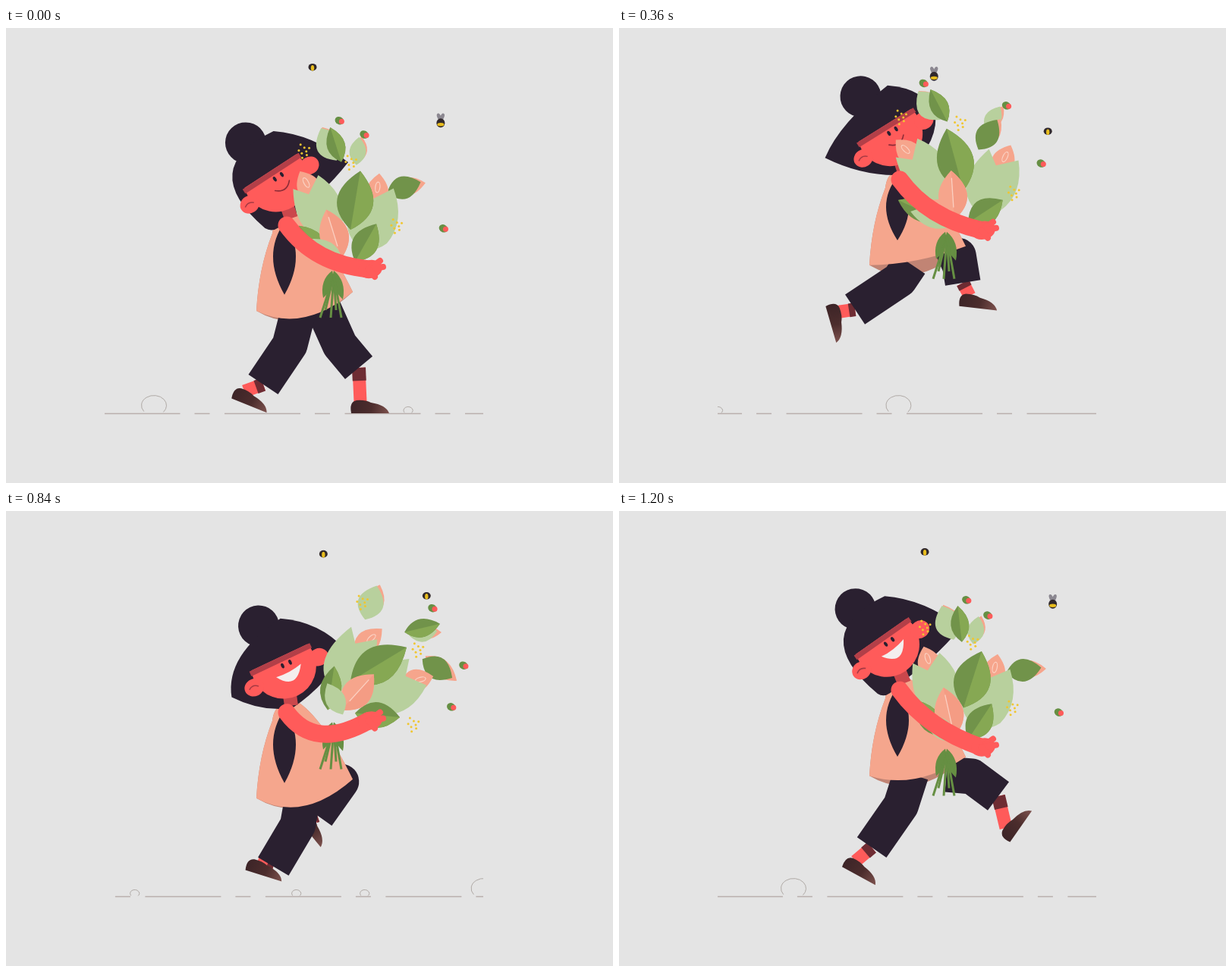
Write an HTML page with a canvas that moves like this. It is 800x600 px and loops after 1240 ms.

```html
<!DOCTYPE html>
<html>
<head>
<meta charset="utf-8">
<style>
html, body { margin: 0; width: 100%; height: 100%; overflow: hidden; background: #e4e4e4 }
canvas { display: block }
</style>
</head>
<body>
<canvas id="stage" width="800" height="600"></canvas>
<script>
const ctx = document.getElementById('stage').getContext('2d');
const LOOP = 1240, STRIDE = LOOP / 2, STEP = 40, RAD = Math.PI / 180;
const INK = '#2a2030', SKIN = '#ff5b5a', SHIRT = '#f5a68d', LINING = '#c18474', PINK = '#f6a58c',
  LIGHT = '#b8d09d', DARK = '#71934a', MID = '#86a853', STEM = '#668f43', YELLOW = '#f0c630';

// Swings between -1 and 1, highest at the peak time.
const wave = (t, peak, period = LOOP) => Math.cos(2 * Math.PI * (t - peak) / period);
const shift = ([x, y], dx, dy) => [x + dx, y + dy];
const polar = ([x, y], degrees, r) => [x + r * Math.sin(degrees * RAD), y - r * Math.cos(degrees * RAD)];
const mix = (a, b, u) => a.map((v, i) => v + (b[i] - v) * u);

// One leg's cycle; the other runs half a loop later. Time, knee, cuff, ankle, shoe angle.
const gait = [
  [0, 440, 418, 465, 448, 467, 493, 0],
  [160, 395, 440, 381, 499, 362, 491, 0],
  [350, 370, 332, 311, 371, 290, 374, 74],
  [520, 367, 342, 320, 390, 305, 420, 46],
  [620, 374, 418, 339, 470, 314, 479, 22],
  [680, 372, 428, 322, 455, 305, 473, 42],
  [780, 437, 390, 385, 433, 370, 435, 58],
  [970, 447, 300, 451, 336, 459, 353, 10],
  [1140, 450, 325, 480, 343, 499, 381, -57],
  [1200, 465, 350, 500, 376, 510, 418, -55]
];

// Everything in the bouquet leans by aim + sway * wave and ends at a distance from the grip.
const cups = [
  { dx: -4, dy: -50, w: 30, aim: -4.5, sway: 24, peak: 840, len: 128 },
  { dx: 40, dy: -32, w: 33, aim: 43, sway: 18, peak: 740, len: 131 }
];
const leaves = [
  { dx: 22, dy: -60, w: 24, aim: 20, sway: 23, peak: 880, len: 142, colors: [DARK, MID] },
  { dx: 28, dy: -18, w: 17, aim: 62, sway: 25, peak: 710, len: 88, colors: [DARK, MID] },
  { dx: -8, dy: -22, w: 14, aim: -28, sway: 29, peak: 880, len: 80, colors: [DARK, MID] },
  { dx: 10, dy: -22, w: 19, aim: 14, sway: 26, peak: 750, len: 87, colors: [PINK, '#f49c84'], vein: true },
  { dx: 12, dy: -16, w: 13, aim: -32, sway: 25, peak: 910, len: 58, colors: [LIGHT] }
];
const sprigs = [
  { size: 51, w: 17, aim: 1, sway: 16, peak: 850, len: 198, colors: [LIGHT], petal: true },
  { size: 40, w: 11, aim: 29, sway: 22, peak: 730, len: 188, colors: [LIGHT], petal: true },
  { size: 48, w: 12, aim: 15, sway: 31, peak: 820, len: 195, colors: [DARK, MID] },
  { size: 50, w: 15, aim: 46, sway: 24, peak: 910, len: 171, colors: [DARK], petal: true }
];
const tinyBuds = [
  { aim: 13, sway: 27, peak: 850, len: 204 },
  { aim: 37, sway: 31, peak: 750, len: 190 },
  { aim: 67, sway: 15, peak: 930, len: 158 }
];
const pollen = [
  { aim: -6, sway: 19, peak: 850, len: 168 },
  { aim: 68, sway: 22, peak: 770, len: 105 },
  { aim: 23, sway: 25, peak: 810, len: 150 }
];

// Periodic monotone cubic through rows of [time, ...values].
function sample(rows, t) {
  const k = rows.length, row = j => rows[(j + k) % k];
  const span = j => (row(j + 1)[0] - row(j)[0] + LOOP) % LOOP;
  const slope = (j, c) => (row(j + 1)[c] - row(j)[c]) / span(j);
  const tangent = (j, c) => {
    const a = slope(j - 1, c), b = slope(j, c);
    return a * b <= 0 ? 0 : 2 * a * b / (a + b);
  };
  let i = k - 1;
  while (rows[i][0] > t) i--;
  const h = span(i), u = (t - rows[i][0]) / h, v = 1 - u;
  return rows[0].slice(1).map((_, n) => {
    const c = n + 1;
    return v * v * (1 + 2 * u) * row(i)[c] + u * u * (3 - 2 * u) * row(i + 1)[c] +
      h * u * v * (v * tangent(i, c) - u * tangent(i + 1, c));
  });
}

function fill(color, draw) {
  ctx.beginPath();
  draw();
  ctx.fillStyle = color;
  ctx.fill();
}
function stroke(color, width, draw, cap = 'butt') {
  ctx.beginPath();
  draw();
  Object.assign(ctx, { strokeStyle: color, lineWidth: width, lineCap: cap, lineJoin: 'round' });
  ctx.stroke();
}
function line(...points) {
  points.forEach((p, i) => i ? ctx.lineTo(...p) : ctx.moveTo(...p));
}
// Start point, then pairs of handle and corner.
function curve(start, ...points) {
  ctx.moveTo(...start);
  for (let i = 0; i < points.length; i += 2) ctx.quadraticCurveTo(...points[i], ...points[i + 1]);
}
const oval = (x, y, rx, ry = rx, a = 0) => ctx.ellipse(x, y, rx, ry, a, 0, 7);
function local([x, y], angle, draw) {
  ctx.save();
  ctx.translate(x, y);
  ctx.rotate(angle);
  draw();
  ctx.restore();
}
// Runs draw(length) with the x axis pointing from one point to the other.
function along([x, y], [tx, ty], draw) {
  local([x, y], Math.atan2(ty - y, tx - x), () => draw(Math.hypot(tx - x, ty - y)));
}
function leaf(root, tip, w, [a, b]) {
  along(root, tip, len => {
    const half = side => curve([0, 0], [len * .45, side * w * 2], [len, 0]);
    fill(a, () => { half(1); half(-1); });
    if (b) fill(b, () => half(1));
  });
}

function ground(t) {
  ctx.save();
  ctx.beginPath();
  ctx.rect(130, 400, 499, 130);
  ctx.clip();
  const period = 158.5, start = (129.5 - 1.068 * t) % period - period;
  stroke('#b9aeac', 1.5, () => {
    for (let x = start; x < 640; x += period) {
      line([x, 508.5], [x + 100, 508.5]);
      line([x + 119, 508.5], [x + 139, 508.5]);
    }
  });
  const stone = (x, r) => stroke('#b0aaa6', 1, () => ctx.ellipse(x - 1.11 * t, 508 - r * .62, r, r * .8, 0, 2.5, 7));
  for (const x of [195, 768, 1562]) stone(x, 16.5);
  for (const x of [530, 1102, 1315, 1405]) stone(x, 6);
  ctx.restore();
}

function leg(t, neck) {
  const [kx, ky, cx, cy, ax, ay, angle] = sample(gait, t % LOOP);
  const hip = [(kx + 398) / 2, neck[1] + 120], knee = [kx, ky], cuff = [cx, cy], ankle = [ax, ay];
  stroke(SKIN, 17, () => line(cuff, ankle));
  stroke('#6e2c33', 18, () => line(cuff, mix(cuff, ankle, .38)));
  local(ankle, angle * RAD, () => {
    const shade = ctx.createLinearGradient(-12, 0, 38, 8);
    shade.addColorStop(0, '#3c2427');
    shade.addColorStop(.55, '#4c2d2d');
    shade.addColorStop(1, '#7b504c');
    fill(shade, () => curve([-12, 15], [-15, 0], [-5, -2], [6, -3], [14, 1], [34, 4], [38, 15]));
  });
  stroke(INK, 47, () => line(hip, knee, cuff));
}

function torso(neck, color, sag) {
  const left = shift(neck, -39, 122), right = shift(neck, 88, 97);
  fill(color, () => curve(shift(neck, -8, 1), shift(neck, -16, 4), shift(neck, -18, 20),
    shift(neck, -36, 66), left, shift(neck, 22, sag), right, shift(neck, 48, 15), shift(neck, 14, -6)));
}

function drawHead(head, neck, tilt, t) {
  const flow = wave(t, 1180), at = (dx, dy) => shift(head, dx, dy);
  const left = at(-65 + 48 * flow, 36 + 22 * flow), back = at(8, 47);
  local(head, tilt, () => fill(INK, () => oval(-7, -71, 27)));
  fill(INK, () => curve(left, at(-85 - 27 * flow, -22), at(-8, -71), at(44, -67),
    at(73 + 22 * wave(t, 1110), -30), at(56, 14), back, shift(mix(left, back, .5), 0, 13), left));
  stroke('#cb474c', 18, () => line(head, shift(neck, 7, 0)));
  local(head, tilt, () => {
    ctx.save();
    ctx.beginPath();
    ctx.rect(-60, -22, 120, 80);
    ctx.clip();
    fill(SKIN, () => oval(0, -9, 43));
    fill('#b33f48', () => ctx.rect(-44, -22, 88, 7));
    ctx.restore();
    for (const side of [-1, 1]) fill(SKIN, () => oval(side * 47, 0, 13, 11.5));
    stroke('#a63a44', 1.5, () => curve([-54, 0], [-47, -5], [-41, 1]));
    if (t >= 800) fill('#f4eeee', () => curve([-15, 0], [3, 28], [22, -2], [3, 3], [-15, 0]));
    else stroke('#8c2d38', 1.6, () => curve([-9, 3], [3, 14], [14, 2]), 'round');
    for (const x of [-1, 10]) fill(INK, () => oval(x, -10, 2, 3.5));
  });
}

function drawCup({ dx, dy, w, aim, sway, peak, len }, grip, t) {
  const lean = sway * wave(t, peak), root = shift(grip, dx, dy);
  const end = polar(grip, aim + lean, len), bud = polar(grip, aim + 1.28 * lean, len + 16);
  const heart = mix(root, end, .65);
  leaf(heart, bud, 15, [PINK]);
  along(heart, bud, l => stroke('#fbd3c5', 1.2, () => oval(l * .62, 0, 7, 3)));
  along(root, end, l => fill(LIGHT, () => {
    curve([0, 0], [l * .2, -w * 1.5], [l * .98, -w * .75]);
    ctx.lineTo(l * .8, -w * .2);
    ctx.lineTo(l * 1.04, w * .5);
    ctx.quadraticCurveTo(l * .6, w * 1.3, l * .2, w * .8);
    ctx.quadraticCurveTo(l * .05, w * .5, 0, 0);
  }));
}

function bouquet(grip, t) {
  const angle = f => f.aim + f.sway * wave(t, f.peak), tipOf = f => polar(grip, angle(f), f.len);
  for (const s of sprigs) {
    // Loose leaves turn twice as far as their stalks.
    const tip = tipOf(s), root = polar(tip, 2 * angle(s) - 15, -s.size);
    if (s.petal) leaf(shift(root, 4, -4), shift(tip, 3, 2), s.w * .8, [PINK]);
    leaf(root, s.petal ? mix(root, tip, .93) : tip, s.w, s.colors);
  }
  cups.forEach(c => drawCup(c, grip, t));
  for (const l of leaves) {
    const root = shift(grip, l.dx, l.dy), tip = tipOf(l);
    leaf(root, tip, l.w, l.colors);
    if (l.vein) stroke('#fbd0c2', 1.3, () => line(mix(root, tip, .25), mix(root, tip, .85)));
  }
  for (const [x, y] of tinyBuds.map(tipOf)) {
    fill(STEM, () => oval(x - 1, y, 6, 5, .5));
    fill(SKIN, () => oval(x + 2, y + 1, 3.5));
  }
  for (const [x, y] of pollen.map(tipOf))
    for (let i = 0; i < 8; i++)
      fill(YELLOW, () => oval(x + Math.cos(i * 2.4) * (3 + i), y + Math.sin(i * 2.4) * (3 + i), 1.5));
  leaf(shift(grip, -2, -6), shift(grip, -14, 30), 6, [STEM]);
  leaf(shift(grip, 0, -6), shift(grip, 12, 32), 6, [STEM]);
  for (let i = 0; i < 5; i++)
    stroke(STEM, 3, () => line(grip, shift(grip, i * 7 - 18, 56 - i % 2 * 10)));
}

function arm(neck, hand) {
  stroke(SKIN, 23, () => curve(shift(neck, 1, 9), shift(neck, 38, 60), hand), 'round');
  fill(SKIN, () => oval(hand[0] + 2, hand[1], 16, 12, -.2));
  for (const [x, y] of [[15, -11], [19, -3], [8, 10]])
    stroke(SKIN, 8, () => line(hand, shift(hand, x, y)), 'round');
}

function bee(x, y, flap) {
  if (flap) for (const side of [-1, 1]) fill('#8b8790', () => oval(x + side * 2, y - 8, 2.5, 5, side * .4));
  fill('#30282c', () => oval(x, y, 5.5, flap ? 6 : 4.8));
  fill('#e8bd1e', () => flap ? oval(x, y + 2, 4.5, 2.2) : oval(x, y + 1, 2.2, 3.8));
}

function draw(t) {
  ctx.fillStyle = '#e4e4e4';
  ctx.fillRect(0, 0, 800, 600);
  ground(t);
  const bounce = wave(t, 117, STRIDE), nod = wave(t, 190, STRIDE);
  const neck = [369, 231 + 58 * bounce + 5 * wave(t, 380)];
  const head = shift(neck, -6 + 7 * nod, -44);
  const hand = shift(neck, 109, 60 - 46 * wave(t, 170, STRIDE));
  torso(neck, LINING, 158);
  leg(t, neck);
  leg(t + STRIDE, neck);
  torso(neck, SHIRT, 142 + 26 * bounce);
  leaf(shift(neck, -2, 5), shift(neck, -2, 97 + 10 * bounce), 15, [INK]);
  drawHead(head, neck, (-31 + 6 * nod) * RAD, t);
  bouquet(shift(hand, -46, 8), t);
  arm(neck, hand);
  bee(411 + 8 * wave(t, 260, STRIDE), 57 - 7 * wave(t, 70, STRIDE), t > 280 && t < 840);
  bee(563 + 11 * wave(t, 90), 124 + 13 * wave(t, 290), t < 280 || t > 840);
}

function tick() {
  draw(Math.floor(performance.now() % LOOP / STEP) * STEP);
  requestAnimationFrame(tick);
}
tick();
</script>
</body>
</html>
```
